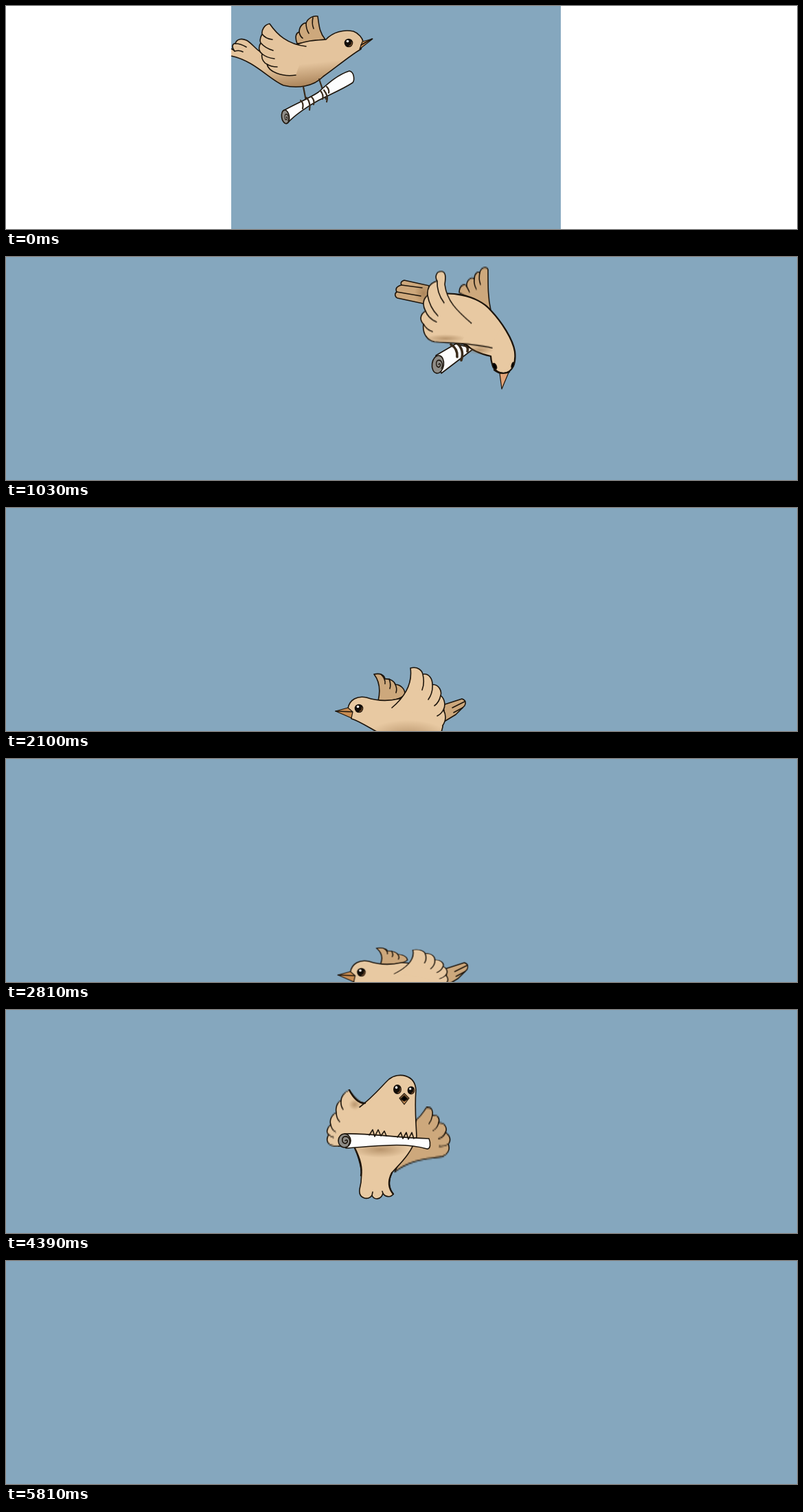
Animation, 1152 px wide and 326 px high, one loop 5.89 s. Source, as an HTML page without scripts:

```html
<!DOCTYPE html>
<html lang="en">
<head>
<meta charset="utf-8">
<title>Letter bird</title>
<style>
html, body { margin: 0; width: 100%; height: 100%; overflow: hidden; background: #85a7be; }
svg { display: block; width: 1152px; height: 326px; }
path, ellipse { stroke: #1c140b; stroke-width: 1.6; stroke-linecap: round; stroke-linejoin: round; }
.skin { fill: #e8c9a2; }
.far { fill: #cda87c; }
.paper { fill: #fdfdfd; }
.roll { fill: #8d8b86; }
.beak { fill: #c98d53; stroke-width: 1.2; }
.line { fill: none; }
.claw { fill: none; stroke: #3a2b1b; stroke-width: 2.2; }
.bold { stroke-width: 2.3; }
.thick { stroke-width: 3.6; }
.bare { stroke: none; }
.soft { stroke: none; fill: url(#shade); }
.heart { fill: #e044e0; stroke: none; }

/* Each pose: a hard on/off switch plus a stepped flight path */
.pose, .margin { animation: 5.89s infinite step-end; }
.pose { animation-timing-function: step-end, steps(4); }
.margin { animation-name: margin-on; }
.soar { animation-name: soar-on, soar; }
.dive { animation-name: dive-on, dive; }
.back { animation-name: back-on, back; }
.glide { animation-name: glide-on, glide; }
.front { animation-name: front-on, front; }
.perch { animation-name: perch-on; }
.letter { animation-name: letter-on, letter; transform-origin: 565px 224px; }

@keyframes margin-on { 0% { opacity: 1 } 1.18%, 100% { opacity: 0 } }
@keyframes soar-on { 0% { opacity: 1 } 15%, 99.99% { opacity: 0 } }
@keyframes dive-on { 0% { opacity: 0 } 15% { opacity: 1 } 27.1%, 100% { opacity: 0 } }
@keyframes back-on { 0% { opacity: 0 } 27.1% { opacity: 1 } 53.8%, 100% { opacity: 0 } }
@keyframes glide-on { 0% { opacity: 0 } 53.8% { opacity: 1 } 70.7% { opacity: 0 } 86.6% { opacity: 1 } 95%, 100% { opacity: 0 } }
@keyframes front-on { 0% { opacity: 0 } 70.7% { opacity: 1 } 79.3%, 100% { opacity: 0 } }
@keyframes perch-on { 0% { opacity: 0 } 79.3% { opacity: 1 } 86.6%, 100% { opacity: 0 } }
@keyframes letter-on { 0% { opacity: 0 } 79.3% { opacity: 1 } 98.6%, 100% { opacity: 0 } }

@keyframes soar {
  0% { transform: none }
  5% { transform: translate(5px, 7px) }
  10.2% { transform: translate(12px, 2px) }
  15%, 100% { transform: translate(150px, 8px) }
}
@keyframes dive {
  0%, 15% { transform: translate(-80px, -6px) }
  17.48% { transform: none }
  21.05% { transform: translate(44px, 64px) }
  27.1%, 100% { transform: translate(48px, 300px) }
}
@keyframes back {
  0%, 27.1% { transform: translate(125px, 60px) }
  32.1% { transform: translate(8px, 4px) }
  35.64% { transform: none }
  39% { transform: translate(-10px, 20px) }
  43% { transform: translate(0, 95px) }
  44.1% { transform: translate(40px, 80px) }
  53.8%, 100% { transform: translate(-106px, -165px) }
}
@keyframes glide {
  0%, 53.8% { transform: translate(30px, -30px) }
  58.73% { transform: none }
  61.1%, 63.4% { transform: translate(82px, -52px) }
  67.2% { transform: translate(236px, 10px) }
  70.7% { transform: translate(190px, 82px) }
  70.8%, 86.6% { transform: translate(120px, -6px) }
  95%, 100% { transform: translate(490px, 40px) }
}
@keyframes front {
  0%, 70.7% { transform: translate(80px, 48px) }
  74.52%, 100% { transform: none }
}
@keyframes letter {
  0%, 79.3% { transform: scaleY(.12) }
  84.2% { transform: none }
  95% { transform: translate(34px, -14px) scaleX(.8) }
  98.6%, 100% { transform: translate(34px, 120px) scaleX(.8) }
}

.wing { animation: flap 589ms var(--phase, 0ms) infinite steps(4); transform-origin: 0 var(--pivot); }
@keyframes flap { 50% { transform: scaleY(var(--fold, -.6)) } }
</style>
</head>
<body>
<svg viewBox="0 0 1152 326">
  <defs>
    <clipPath id="window"><path d="M328 0H808V326H328Z"/></clipPath>
    <radialGradient id="shade">
      <stop offset="0" stop-color="#8a6238" stop-opacity=".5"/>
      <stop offset="1" stop-color="#8a6238" stop-opacity="0"/>
    </radialGradient>
    <linearGradient id="belly" x1=".45" y1=".45" x2=".6" y2="1">
      <stop offset=".3" stop-color="#e4c49d"/>
      <stop offset="1" stop-color="#a98258"/>
    </linearGradient>
    <g id="eye">
      <circle r="6.3" fill="#120d08"/>
      <path d="M1 4.5A4.5 4.5 0 0 0 4.5 -1" fill="none" style="stroke:#6b4526"/>
      <circle cx="-1.5" cy="-2.5" r="1.8" fill="#fff"/>
    </g>
    <path id="spiral" class="line" d="M0 0C3 -3 5 2 1 4C-5 5 -6 -4 -1 -6C6 -7 9 1 5 6"/>
  </defs>

  <rect width="1152" height="326" fill="#85a7be"/>
  <g class="margin" fill="#fff"><rect width="328" height="326"/><rect x="808" width="344" height="326"/></g>

  <g clip-path="url(#window)">
    <g class="pose soar">
      <g class="wing" style="--pivot:52px">
        <path class="far" d="M424 55C420 44 423 39 427 38C427 30 433 24 437 25C440 17 448 14 454 15C456 28 456 38 465 49Z"/>
        <path class="line" d="M427 38Q428 44 432 47M437 25Q437 34 441 40M447 17Q445 26 448 33"/>
      </g>
      <path fill="url(#belly)" d="M312 69C318 60 327 60 333 66C326 57 333 54 334 55C336 48 343 47 350 50C358 54 364 64 372 68L424 56C440 50 452 50 466 49C476 38 492 34 506 37C514 40 519 47 520 52L517 63C500 73 478 92 462 103C448 118 424 121 404 116C384 108 362 80 328 73Z"/>
      <path class="line" d="M333 66Q340 64 345 67M334 55Q342 55 350 60"/>
      <g class="wing" style="--pivot:66px">
        <path class="bare" fill="#e4c49d" d="M437 59C410 56 395 42 384 26C376 27 372 36 373 41C369 48 370 52 371 54C366 62 370 68 373 70C371 78 377 84 380 85C382 96 402 104 422 101"/>
        <path class="line" d="M437 59C410 56 395 42 384 26C376 27 372 36 373 41C369 48 370 52 371 54C366 62 370 68 373 70C371 78 377 84 380 85C382 96 402 104 422 101M373 41Q378 48 388 49M371 54Q378 62 389 65M373 70Q380 76 391 77M380 85Q386 89 395 89"/>
      </g>
      <path class="beak" d="M519 52L534 48L515 63Z"/>
      <path class="line" d="M517 57L533 48"/>
      <use href="#eye" x="499" y="54"/>
      <path class="claw" d="M433 118L438 144M456 107L466 136"/>
      <path class="paper" d="M404 153C425 141 440 136 455 126C470 112 484 100 500 95C507 96 508 108 505 112C490 122 470 130 455 138C440 146 420 160 410 171Z"/>
      <ellipse class="roll" cx="407" cy="162" rx="5.5" ry="10" transform="rotate(-8 407 162)"/>
      <use href="#spiral" transform="translate(408 163) scale(.5 .8)"/>
      <path class="claw" d="M429 138Q434 142 432 150M438 134Q444 142 442 152M445 133Q450 138 448 144M458 124Q463 130 461 136M463 123Q470 132 467 140M467 118Q471 122 470 127"/>
    </g>

    <g class="pose dive">
      <path class="far" d="M616 42L580 34C574 36 575 39 576 41C568 43 567 47 569 51C565 54 567 59 570 60L612 69Z"/>
      <ellipse class="soft" cx="608" cy="53" rx="13" ry="16"/>
      <path class="line" d="M576 41L606 45M569 51L604 57"/>
      <g class="wing" style="--pivot:70px;--phase:-148ms;--fold:.1">
        <path class="far" d="M660 52C660 42 668 37 671 43C670 34 678 28 682 32C682 24 688 20 690 23C692 14 700 14 702 18C702 45 702 60 706 78Z"/>
        <path class="line" d="M671 43L675 51M682 32Q681 40 685 47M690 23Q688 32 691 40"/>
      </g>
      <path class="paper" d="M626 144L655 127L681 134L634 170Z"/>
      <ellipse class="roll" cx="629" cy="157" rx="8.5" ry="13" transform="rotate(8 629 157)"/>
      <use href="#spiral" transform="translate(630 157) scale(.8 1)"/>
      <path class="claw thick" d="M648 128Q658 134 657 146M657 126Q668 136 663 151M668 128Q674 132 672 138"/>
      <path class="skin bold" d="M616 60C640 46 688 56 706 78C722 95 738 120 741 138C743 155 738 168 726 170C715 171 707 162 706 145C692 142 680 138 670 128L624 118Z"/>
      <ellipse class="soft" cx="690" cy="136" rx="20" ry="7"/>
      <g class="wing" style="--pivot:110px;--phase:-148ms;--fold:.4">
        <path class="skin" d="M678 97C656 78 642 64 639 40C641 28 640 21 634 21C625 21 625 31 628 35C616 38 613 48 614 56C606 62 607 72 611 79C603 84 602 92 608 98C606 112 614 122 624 124C650 126 680 126 708 133"/>
        <ellipse class="soft" cx="640" cy="119" rx="30" ry="6"/>
        <path class="line" d="M628 35Q627 52 638 67M614 56Q617 74 629 86M611 79Q615 90 627 95M608 98Q612 106 621 109"/>
      </g>
      <path class="skin bare" d="M679 96L706 82L720 104L706 130L664 123Z"/>
      <path class="beak" d="M719 170L732 169L722 193Z" style="fill:#e2a478"/>
      <ellipse cx="711.5" cy="160" rx="2.6" ry="4.5" transform="rotate(-25 711 160)"/>
      <ellipse cx="738" cy="158" rx="1.4" ry="4" transform="rotate(18 738 158)"/>
      <path class="line bold" d="M711 165Q721 173 733 168"/>
    </g>

    <g class="pose back">
      <path class="far" d="M630 290L664 279C670 281 670 285 668 289L655 302L632 316Z"/>
      <path class="line" d="M668 283L650 292M665 292L652 299"/>
      <g class="wing" style="--pivot:280px;--phase:-256ms">
        <path class="far" d="M542 282C546 265 543 252 536 243C545 241 551 244 552 250C560 249 566 254 567 258C574 258 581 264 581 272C576 280 560 283 542 282Z"/>
        <path class="line" d="M546 243Q553 250 552 257M558 250Q561 258 559 264M567 258Q570 264 568 270"/>
      </g>
      <path class="paper" d="M540 350L604 340L610 358L546 370Z"/>
      <ellipse class="roll" cx="543" cy="360" rx="7" ry="10"/>
      <path class="claw" d="M565 335L570 356M586 337L590 354"/>
      <path class="skin" d="M498 293C500 280 512 274 525 277C540 282 555 283 572 279C590 278 620 290 638 295L636 320C630 350 600 358 570 342C540 330 520 313 503 308Z"/>
      <ellipse class="soft" cx="585" cy="334" rx="60" ry="24"/>
      <g class="wing" style="--pivot:300px;--phase:-256ms">
        <path class="skin bare" d="M562 292C582 275 592 255 589 234C600 231 606 238 607 243C616 241 621 250 621 258C631 258 635 268 633 274C640 280 640 290 637 295C642 304 640 312 636 318L600 300Z"/>
        <path class="line" d="M562 292C582 275 592 255 589 234C600 231 606 238 607 243C616 241 621 250 621 258C631 258 635 268 633 274C640 280 640 290 637 295C642 304 640 312 636 318M607 243Q610 256 606 266M621 258Q622 270 615 280M633 274Q631 284 624 289M637 295Q634 301 628 304"/>
      </g>
      <path class="beak" d="M498 292L480 297L503 307L505 298Z"/>
      <path class="line" d="M480 297L504 298"/>
      <use href="#eye" x="514" y="293"/>
    </g>

    <g class="pose glide">
      <path class="paper" d="M419 200L430 236L457 230L449 202Z"/>
      <path class="roll bold" d="M431 226C438 218 454 220 457 228C458 238 452 242 434 241C430 238 429 230 431 226Z"/>
      <use href="#spiral" transform="translate(443 231) scale(1.1)"/>
      <path class="skin" d="M357 157L330 134C326 126 330 122 335 124C332 116 336 112 340 112C338 105 346 102 352 107C358 112 362 118 365 122C372 115 380 112 386 112C392 105 402 103 410 106C418 101 428 103 430 104C440 100 448 104 451 109C440 112 430 116 420 122C440 118 470 117 482 121C490 126 493 136 492 148L484 157C470 163 458 165 449 168C420 182 380 180 357 157Z"/>
      <path class="line" d="M411 123L424 122M352 107L377 136M340 112L354 127M335 124L347 133M386 111L380 118M410 105Q400 110 396 115M430 104Q420 109 416 114M441 103Q432 108 428 113"/>
      <g class="wing" style="--pivot:158px;--phase:-74ms">
        <path class="skin" d="M430 153C440 156 446 162 449 168C458 178 464 192 469 203C460 207 448 205 442 203C432 206 420 204 414 199C406 202 398 198 394 193C386 194 379 189 377 185C368 182 358 170 357 157"/>
        <path class="line" d="M428 181Q432 194 443 203M399 178Q403 192 414 199M381 175Q384 188 394 193M366 163Q367 178 377 185"/>
        <ellipse class="soft" cx="445" cy="198" rx="24" ry="8"/>
      </g>
      <path class="skin bare" d="M362 154L380 138L432 138L446 160L385 166Z"/>
      <path class="line" d="M430 153C440 156 446 162 449 168"/>
      <path class="beak" d="M491 149L503 159L483 158Z" style="fill:#d8a772"/>
      <use href="#eye" x="476" y="146"/>
    </g>

    <g class="pose front">
      <g class="wing" style="--pivot:190px;--phase:-322ms;--fold:.5">
        <path class="far" d="M598 160C606 154 609 146 613 142C621 142 622 148 621 154C630 152 632 160 630 165C640 164 643 174 640 179C648 184 648 192 644 196C648 204 642 212 636 214C620 218 590 216 566 237L590 185Z"/>
        <path class="line" d="M621 154Q620 161 616 166M630 165Q628 173 622 176M640 179Q637 186 630 188M644 196Q637 200 631 199"/>
      </g>
      <g class="wing" style="--pivot:190px;--phase:-322ms;--fold:.5">
        <path class="skin" d="M521 137C510 133 504 122 500 117C492 120 488 128 488 132C481 135 480 145 481 150C473 154 471 162 473 168C467 172 466 180 470 182C464 192 470 200 484 199L540 190L530 135Z"/>
        <path class="line" d="M488 132Q487 140 491 145M481 150Q481 158 486 163M473 168Q475 176 480 178M470 182Q474 186 477 186"/>
        <ellipse class="soft" cx="508" cy="138" rx="9" ry="8"/>
      </g>
      <path class="skin bare" d="M515 142C535 127 550 108 558 101C572 90 596 95 597 117C595 145 597 160 598 185C590 212 570 228 562 238C556 250 558 262 564 269C560 275 552 273 549 268C546 278 536 278 533 271C528 279 513 276 515 262C521 240 516 222 508 202L500 180Z"/>
      <path class="line" d="M515 142C535 127 550 108 558 101C572 90 596 95 597 117C595 145 597 160 598 185C590 212 570 228 562 238C556 250 558 262 564 269C560 275 552 273 549 268C546 278 536 278 533 271C528 279 513 276 515 262C521 240 516 222 508 202M533 271L534 266M549 268L548 265"/>
      <path class="line bold" d="M500 117Q510 137 523 136M508 202Q520 226 517 242M562 238Q553 256 564 269"/>
      <ellipse class="soft" cx="545" cy="204" rx="42" ry="12"/>
      <path class="paper" d="M493 181C530 180 560 186 616 188C619 195 618 204 613 203C580 193 540 199 495 202Z"/>
      <ellipse class="roll" cx="493" cy="191" rx="9" ry="10"/>
      <use href="#spiral" x="494" y="191"/>
      <path class="line" d="M529 183L534 175L537 185L542 175L546 184L551 177L554 184M570 186L575 179L578 188L583 179L586 189L591 179L594 188"/>
      <path class="beak" d="M573 129L580 122L587 129L580 138Z"/>
      <path d="M575 130L580 125L585 130L580 133Z"/>
      <use href="#eye" transform="translate(570 116) scale(.95 1.1)"/>
      <use href="#eye" transform="translate(590 117.5) scale(.85 .95)"/>
    </g>

    <g class="pose letter">
      <path class="paper" d="M523 227L606 221C607 266 628 255 656 326L662 345L558 345C535 318 522 305 510 268Z"/>
      <path class="heart" d="M565 255C555 245 532 249 532 268C533 292 560 303 600 319C606 303 608 285 606 268C602 242 578 240 565 255Z"/>
    </g>

    <g class="pose perch">
      <path class="skin" d="M491 124C505 111 522 92 535 88C548 84 558 95 559 112L557 126C555 150 560 170 548 190C536 208 524 222 521 240L521 262C518 272 508 270 505 262C502 280 486 280 486 264C478 274 464 270 465 263C472 245 470 225 462 205C452 188 446 175 444 165C438 155 440 142 449 137C446 120 456 112 461 113C462 102 472 98 475 101C478 92 488 88 489 93Z"/>
      <ellipse class="soft" cx="532" cy="203" rx="20" ry="8" transform="rotate(-58 532 203)"/>
      <ellipse class="soft" cx="514" cy="250" rx="8" ry="24"/>
      <path class="line" d="M449 137Q448 150 456 161M461 113Q460 136 467 150M475 101Q471 122 478 139M489 93Q487 120 497 137M488 246L486 264M504 254L505 262"/>
      <path class="beak" d="M557 108L549 116L549 124L565 126Z"/>
      <path class="line" d="M549 117L565 126L557 113"/>
      <use href="#eye" transform="translate(537 108) scale(1.35)"/>
    </g>
  </g>
</svg>
</body>
</html>
```
